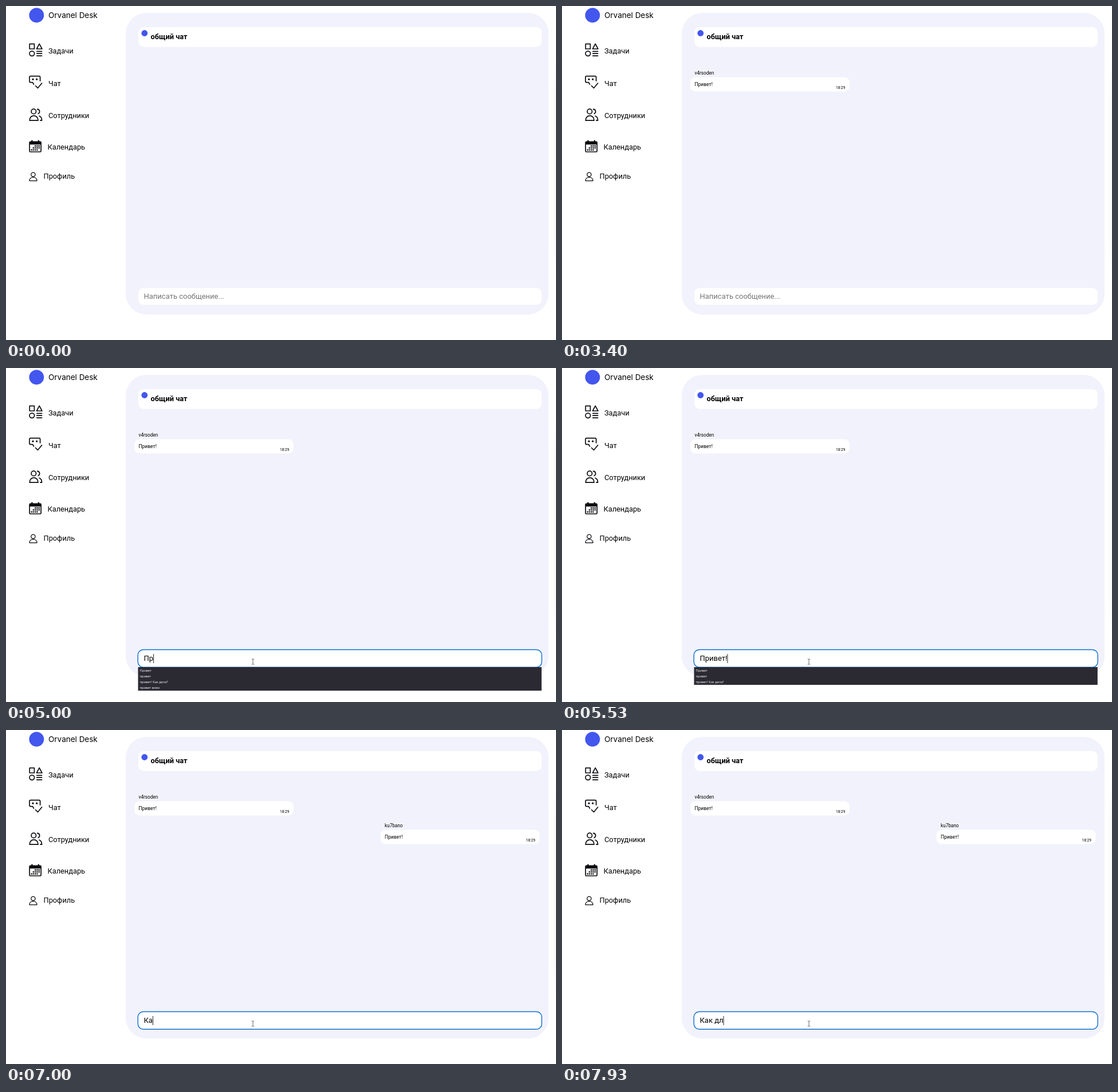
Animation, 960 px wide and 584 px high, one loop 8 s. Source, as an HTML page:

```html
<!DOCTYPE html>
<html lang="ru">
<head>
<meta charset="utf-8">
<style>
  html, body { margin: 0; width: 100%; height: 100%; overflow: hidden; background: #fff; }
  svg { display: block; width: 960px; height: 584px; font-family: Roboto, sans-serif; }
  .nav { font-size: 12.8px; }
  .icon { fill: none; stroke: #0b0b0f; stroke-width: 1.7; stroke-linecap: round; stroke-linejoin: round; }
  .field { font-size: 13px; }
  .name { font-size: 8.2px; }
  .body { font-size: 8.5px; }
  .time { font-size: 6.6px; }
  .row { font: 5.7px "Open Sans", sans-serif; fill: #fbfbfe; }
</style>
</head>
<body>
<svg viewBox="0 0 960 584">
  <defs>
    <filter id="soft" x="-400%" width="900%" y="-20%" height="140%"><feGaussianBlur stdDeviation="6 22"/></filter>
    <g id="bubble"><rect width="278" height="25" rx="9" fill="#fff"/></g>
  </defs>
  <rect x="962" y="120" width="12" height="320" fill="#000" opacity=".1" filter="url(#soft)"/>

  <circle cx="53.3" cy="16.2" r="12.9" fill="#4356ee"/>
  <text x="74" y="21" style="font:13.5px Inter,sans-serif">Orvanel Desk</text>

  <g class="icon">
    <path d="M41.2 66.4h8.2v8.6h-8.2zM58.2 66.2l4.7 8.8h-9.4zM53.8 79.3h8.8M53.8 83.2h8.8M53.8 87.1h8.8"/>
    <circle cx="45.3" cy="83.1" r="4.3"/>
    <path d="M48.5 137l-2-3.4H43a2 2 0 0 1-2-2v-7a2 2 0 0 1 2-2h14.6a2 2 0 0 1 2 2v6.4M51.5 139.5l4 4 7-8.5"/>
    <circle cx="48.3" cy="184.4" r="4.2"/>
    <path d="M41.2 200.2c0-11.2 14.8-11.2 14.8 0zM54.6 180.4a4.2 4.2 0 0 1 1.6 8M58 192.3c3.1 1 4.5 4 4.5 7.9h-2.6"/>
    <rect x="41.1" y="237.4" width="20" height="17.6" rx="1.5"/>
    <g stroke-width="1.3">
      <circle cx="47.4" cy="294.8" r="3.6"/>
      <path d="M41 305.6c0-8.2 13-8.2 13 0z"/>
    </g>
  </g>
  <g fill="#0b0b0f">
    <circle cx="47" cy="128.2" r="1.6"/><circle cx="53.6" cy="128.2" r="1.6"/>
    <path d="M41 237h20.300v5.200h-20.300zM44.200 234.800h2.400v3h-2.400zM55.600 234.800h2.400v3h-2.400z"/>
    <path id="days"/>
  </g>
  <g class="nav">
    <text x="74" y="83">Задачи</text>
    <text x="74" y="139.500">Чат</text>
    <text x="74" y="196">Сотрудники</text>
    <text x="72.500" y="250.700">Календарь</text>
    <text x="65.500" y="301.500">Профиль</text>
  </g>

  <rect x="209" y="12" width="738" height="527.500" rx="36" fill="#f2f2fc"/>
  <rect x="231" y="37" width="704" height="34.500" rx="9" fill="#fff"/>
  <circle cx="241.800" cy="47.500" r="5.400" fill="#4356ee"/>
  <text x="252.500" y="58.300" font-size="12.800" font-weight="700">общий чат</text>

  <g id="first" transform="translate(224 124.500)">
    <use href="#bubble"/>
    <text class="name" x="7.500" y="-4.600">v4rsoden</text>
    <text class="body" x="7.500" y="15.200">Привет!</text>
    <text class="time" x="254" y="20.600">18:29</text>
  </g>
  <g id="second" transform="translate(653.500 174.400)">
    <use href="#bubble"/>
    <text class="name" x="7.500" y="-4.600">ku7bano</text>
    <text class="body" x="7.500" y="15.200">Привет!</text>
    <text class="time" x="254" y="20.600">18:29</text>
  </g>

  <rect x="231" y="493" width="704" height="29.500" rx="9" fill="#fff"/>
  <rect id="ring" x="230.200" y="492.500" width="705" height="30.700" rx="9.500" fill="#fff" stroke="#0a6fd0" stroke-width="1.400"/>
  <text id="hint" class="field" x="240.500" y="512" fill="#757575">Написать сообщение...</text>
  <text id="typed" class="field" x="240.500" y="512" xml:space="preserve"></text>
  <rect id="caret" y="500" width="1" height="16" fill="#222"/>
  <g id="list"></g>

  <g id="pointer">
    <path id="arrow" d="M0 0v11l2.500-2.300 1.800 4 1.800-.8-1.800-3.900h3.500z" fill="#fff" stroke="#000" stroke-width=".8"/>
    <path id="beam" d="M-2.200-4.500h1.500l.7.500.7-.5h1.500M0-4v8M-2.200 4.500h1.500l.7-.5.7.5h1.500" fill="none" stroke="#555" stroke-width=".9"/>
  </g>
</svg>
<script>
const LOOP = 8000, MOVE_START = 3870, FOCUS = 4400;
const $ = id => document.getElementById(id);
const show = (id, on) => $(id).setAttribute('visibility', on ? 'visible' : 'hidden');

const hello = ['Привет', 'привет', 'привет! Как дела?'];
const how = ['Как дела?'];

// time, typed text, caret visible, suggestions
const steps = [
  [0, '', 0, []],
  [FOCUS, '', 1, []],
  [4870, 'П', 0, []],
  [4930, 'П', 1, [...hello, 'привет всем']],
  [5000, 'Пр', 1, [...hello, 'привет всем']],
  [5130, 'При', 1, [...hello, 'привет всем']],
  [5200, 'Прив', 1, [...hello, 'привет всем']],
  [5330, 'Приве', 1, [...hello, 'привет всем']],
  [5400, 'Привет', 1, [...hello, 'привет всем']],
  [5470, 'Привет', 1, hello],
  [5530, 'Привет!', 1, hello],
  [5600, 'Привет!', 1, hello.slice(2)],
  [5800, '', 1, []],
  [6470, '', 0, []],
  [6870, 'К', 1, []],
  [6930, 'К', 1, [...how, 'как дела']],
  [7000, 'Ка', 1, []],
  [7070, 'Ка', 1, how],
  [7130, 'Как', 1, how],
  [7270, 'Как ', 1, how],
  [7330, 'Как д', 1, how],
  [7530, 'Как дл', 1, how],
  [7600, 'Как дла', 1, []],
  [7930, 'Как дл', 1, []]
];

let days = '';
for (let row = 0; row < 3; row++)
  for (let col = 0; col < 5; col++)
    if (row + col > 1 && row + col < 6) days += `M${43.4 + col * 3.3} ${243.6 + row * 3.4}h2.300v2.300h-2.300z`;
$('days').setAttribute('d', days);

function drawList(rows) {
  $('list').innerHTML = rows.length
    ? `<rect x="230.500" y="523" width="704.300" height="${rows.length * 10.2 + .4}" fill="#2b2a33"/>` +
      rows.map((s, i) => `<text class="row" x="233.500" y="${530.8 + i * 10.15}">${s}</text>`).join('')
    : '';
}

function drawPointer(t) {
  show('pointer', t >= MOVE_START);
  const k = Math.min(1, Math.floor(Math.max(0, t - MOVE_START) / 66) / 7);
  const ease = 1 - (1 - k) ** 2;
  const x = 470 - 39 * ease, y = 295 + 218.5 * ease;
  $('pointer').setAttribute('transform', `translate(${x} ${y})`);
  const overField = y > 492;
  $('arrow').style.display = overField ? 'none' : '';
  $('beam').style.display = overField ? '' : 'none';
}

let current;
function draw() {
  const t = performance.now() % LOOP;
  const step = steps.findLast(s => s[0] <= t);
  if (step !== current) {
    const [, text, caret, rows] = current = step;
    $('typed').textContent = text.replace(/ /g, '\u00a0');
    show('hint', !text);
    show('caret', caret);
    $('caret').setAttribute('x', 240.5 + (text ? $('typed').getComputedTextLength() : 0));
    drawList(rows);
  }
  show('first', t >= 3400);
  show('second', t >= 5930);
  show('ring', t >= FOCUS);
  drawPointer(t);
  requestAnimationFrame(draw);
}
draw();
</script>
</body>
</html>
```
